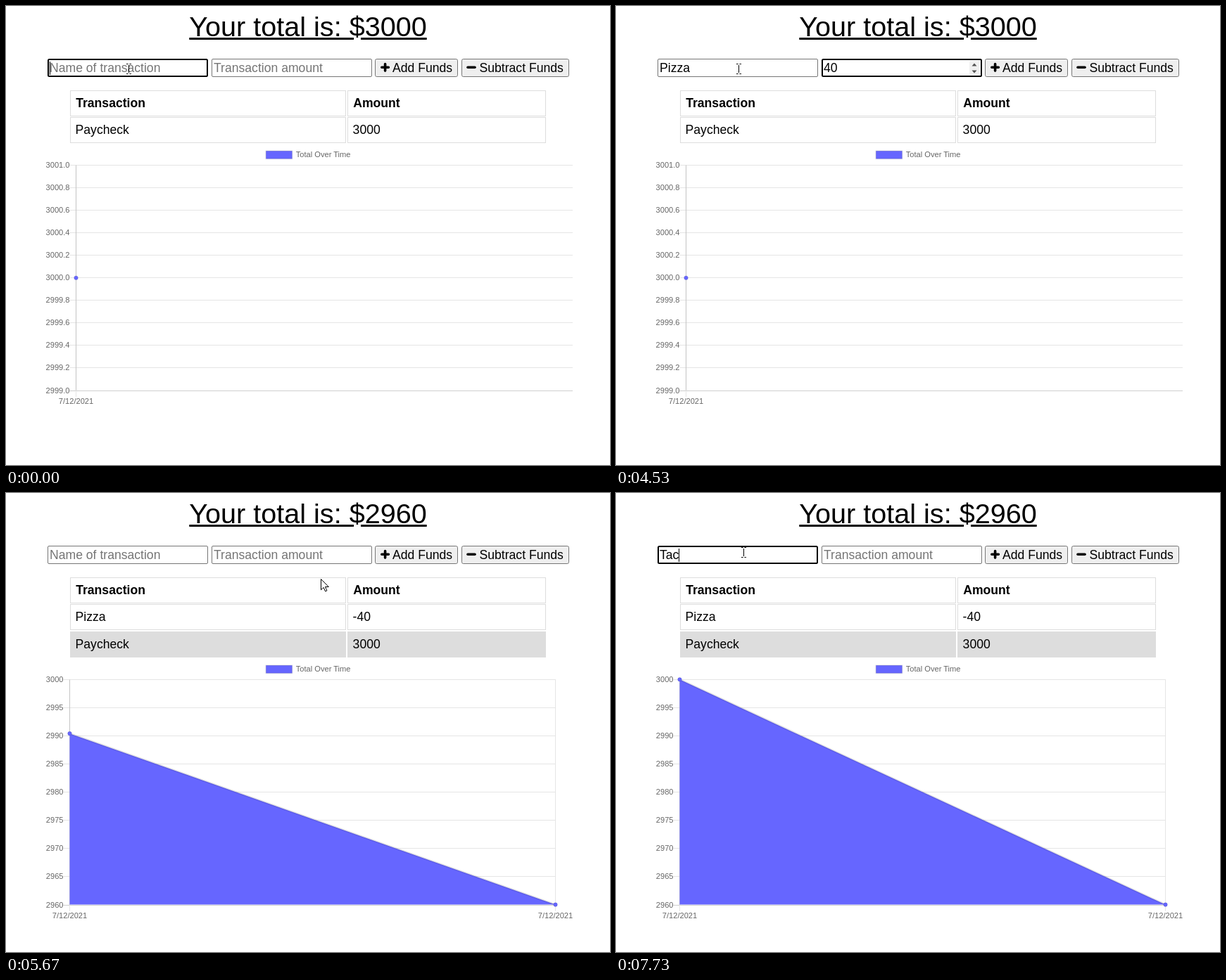
An HTML page that plays this animation: 858x653 px, repeating every 8000 ms.

```html
<!DOCTYPE html>
<html lang="en">
<head>
<meta charset="utf-8">
<title>Budget tracker</title>
<style>
  html, body { margin: 0; width: 858px; height: 653px; overflow: hidden; background: #fff; }
  body { position: relative; font-family: "Liberation Sans", Arial, sans-serif; }
  #title { position: absolute; left: 0; top: 9px; width: 858px; text-align: center;
    font-size: 39.6px; line-height: 40px; text-decoration: underline; white-space: nowrap; }
  svg { position: absolute; left: 0; top: 0; display: block; }
  text { font-size: 17.6px; white-space: pre; }
  .th { font-weight: bold; }
  .tick { font-size: 11.1px; fill: #666; }
</style>
</head>
<body>
<div id="title"></div>
<svg id="stage" width="858" height="653" viewBox="0 0 858 653"></svg>
<script>
const LOOP = 8000, FPS = 15, BLUE = '#6666ff';
const stage = document.getElementById('stage');
const title = document.getElementById('title');

function add(parent, tag, attrs, content) {
  const el = document.createElementNS('http://www.w3.org/2000/svg', tag);
  set(el, attrs);
  if (content !== undefined) el.textContent = content;
  parent.appendChild(el);
  return el;
}
function set(el, attrs) {
  for (const k in attrs) el.setAttribute(k, attrs[k]);
}
const show = (el, on) => set(el, { visibility: on ? 'visible' : 'hidden' });
const text = (p, x, y, s, attrs) => add(p, 'text', { x, y, ...attrs }, s);
const path = (p, d, attrs) => add(p, 'path', { d, ...attrs });

// ---- form ----
function makeInput(x, hint) {
  const box = add(stage, 'rect', { rx: 1.5, fill: '#fff' });
  const label = text(stage, x + 3, 94, '');
  const caret = add(stage, 'rect', { y: 79, width: 1, height: 19 });
  return (value, focus, caretOn) => {
    const w = focus ? 2 : 1;
    set(box, {
      x: x + w / 2 - .5 * (w - 1) + .5 * (w - 1), y: 75 + w / 2, width: 228 - w, height: 26 - w,
      stroke: focus ? '#000' : '#767676', 'stroke-width': w
    });
    label.textContent = value || hint;
    set(label, { fill: value ? '#000' : '#757575' });
    const end = value ? Math.round(label.getComputedTextLength()) : 0;
    set(caret, { x: x + 3 + end });
    show(caret, focus && caretOn);
  };
}
function makeButton(x, width, icon, textX, label) {
  const box = add(stage, 'rect', { x: x + .5, y: 75.5, width: width - 1, height: 25, rx: 2.2 });
  path(stage, icon, { stroke: '#000', 'stroke-width': 3.6, 'stroke-linecap': 'round' });
  text(stage, textX, 94, label);
  return hover => set(box, { fill: hover ? '#e5e5e5' : '#efefef', stroke: hover ? '#4f4f4f' : '#767676' });
}
const nameInput = makeInput(59, 'Name of transaction');
const amountInput = makeInput(292, 'Transaction amount');
const spinner = add(stage, 'g', {});
add(spinner, 'rect', { x: 502, y: 78, width: 14, height: 20, fill: '#f0f0f0' });
path(spinner, 'M505.5 85.5l3.5-4 3.5 4zM505.5 91.5l3.5 4 3.5-4z', { fill: '#505050' });
const addButton = makeButton(524, 118, 'M533.8 87.3h9.6M538.6 82.5v9.6', 549, 'Add Funds');
const subButton = makeButton(647, 153, 'M656 87.3h10', 672.5, 'Subtract Funds');

// ---- table ----
function row(parent, y, a, b, opt = {}) {
  [[91, 392, a], [485, 282, b]].forEach(([x, w, s]) => {
    add(parent, 'rect', { x: x + .5, y: y + .5, width: w - 1, height: 36, fill: opt.fill || '#fff', stroke: '#ddd' });
    text(parent, x + (opt.head ? 8.2 : 7.6), y + 24, s, opt.head ? { class: 'th' } : {});
  });
}
row(stage, 120, 'Transaction', 'Amount', { head: true });
const before = add(stage, 'g', {}), after = add(stage, 'g', {});
row(before, 158, 'Paycheck', '3000');
row(after, 158, 'Pizza', '-40');
row(after, 197, 'Paycheck', '3000', { fill: '#ddd' });

// ---- chart ----
function line(parent, x1, y1, x2, y2, stroke) {
  add(parent, 'line', { x1, y1, x2, y2, stroke });
}
function chart(parent, left, right, top, labels) {
  const bottom = top + 320.5, n = labels.length - 1;
  add(parent, 'rect', {
    x: 369.3, y: top - 20.3, width: 37.2, height: 11.2, fill: BLUE, stroke: '#000', 'stroke-opacity': .1, 'stroke-width': 1.6
  });
  text(parent, 411.8, top - 11.5, 'Total Over Time', { class: 'tick' });
  labels.forEach((s, i) => {
    const y = Math.floor(top + 320.5 * i / n) + .5;
    line(parent, left - 9, y, right, y, i === n ? '#cfcfcf' : '#e5e5e5');
    text(parent, left - 9, y + 3, s, { class: 'tick', 'text-anchor': 'end' });
  });
  line(parent, left, top, left, bottom + 9, '#e5e5e5');
  line(parent, left, top, left, bottom, '#c4c4c4');
}
const date = (parent, x, y) => text(parent, x, y, '7/12/2021', { class: 'tick', 'text-anchor': 'middle' });
const dot = (parent, cx, cy) => add(parent, 'circle', {
  cx, cy, r: 2.8, fill: BLUE, stroke: '#000', 'stroke-opacity': .1
});
const ticks = (n, f) => Array.from({ length: n }, (_, i) => f(i));

chart(before, 99.5, 805, 226.5, ticks(11, i => (3001 - i / 5).toFixed(1)));
date(before, 99.5, 566);
dot(before, 99.5, 386.7);

const X0 = 90.5, X1 = 780.5, TOP = 265.3, BASE = 585.6;
chart(after, X0, X1, 265.5, ticks(9, i => 3000 - 5 * i));
line(after, X1, 265, X1, 595, '#e5e5e5');
date(after, X0, 604.5);
date(after, X1, 604.5);
const area = path(after, '', { fill: BLUE });
const edge = path(after, '', { stroke: '#000', 'stroke-opacity': .1, 'stroke-width': 2.8, fill: 'none' });
const startDot = dot(after, X0, BASE);
dot(after, X1, BASE);

// ---- pointer ----
const arrow = path(stage, 'M.5.5v15.3l3.6-3.4 2.5 5.5 2.3-1-2.4-5.4h4.8z', { fill: '#fff', stroke: '#000' });
const beam = path(stage, 'M.5-5v11M-3-6.5h2.6M1.4-6.5h2.6M-3 7.5h2.6M1.4 7.5h2.6', { stroke: '#000', fill: 'none' });

// time, x, y
const track = [
  [0, 174, 89], [4533, 174, 89], [4600, 192, 94], [4667, 275, 106], [4733, 395, 110], [4800, 515, 109],
  [4867, 615, 103], [4933, 685, 95], [5000, 722, 87], [5067, 731, 82], [5400, 731, 82], [5467, 690, 92],
  [5533, 612, 109], [5600, 530, 119], [5667, 447, 122], [5733, 372, 120], [5800, 297, 114],
  [5867, 232, 107], [5933, 185, 101], [6000, 180, 92], [6067, 181, 84], [LOOP, 181, 84]
];
function pointer(t) {
  const i = Math.max(1, track.findIndex(k => k[0] >= t));
  const [ta, xa, ya] = track[i - 1], [tb, xb, yb] = track[i];
  const u = (t - ta) / (tb - ta);
  return [Math.round(xa + (xb - xa) * u), Math.round(ya + (yb - ya) * u)];
}

// ---- script of typing and caret: [time, value] ----
const nameSteps = [[0, ''], [1530, 'P'], [1730, 'Pi'], [2000, 'Piz'], [2470, 'Pizz'], [2730, 'Pizza'],
  [5465, ''], [7130, 'T'], [7470, 'Ta'], [7730, 'Tac']];
const amountSteps = [[0, ''], [3870, '4'], [4000, '40'], [5465, '']];
const caretSteps = [[0, true], [470, false], [1000, true], [3470, false], [3870, true],
  [4530, false], [6265, true], [6800, false], [7130, true]];
const at = (steps, t) => steps.filter(s => s[0] <= t).pop()[1];

function draw(ms) {
  // the picture advances at 15 frames a second
  const t = Math.floor((ms + 4) * FPS / 1000) * 1000 / FPS + .5;
  const paid = t >= 5330;
  title.textContent = 'Your total is: $' + (paid ? 2960 : 3000);
  show(before, !paid);
  show(after, paid);

  const caret = at(caretSteps, t + 4);
  const onAmount = t >= 2930 && t < 5065;
  nameInput(at(nameSteps, t + 4), t < 2930 || t >= 6265, caret);
  amountInput(at(amountSteps, t + 4), onAmount, caret);
  show(spinner, onAmount);

  const u = Math.min(1, Math.max(0, (t - 5367) / 1000));
  const y = BASE - (BASE - TOP) * (1 - (1 - u) ** 4);
  set(area, { d: `M${X0} ${y}L${X1} ${BASE}H${X0}z` });
  set(edge, { d: `M${X0} ${y}L${X1} ${BASE}` });
  set(startDot, { cy: y });

  const [x, py] = pointer(t);
  const inside = (a, b) => x >= a && x < b && py >= 75 && py < 101;
  const typing = inside(59, 287) || inside(292, 520);
  addButton(inside(524, 642));
  subButton(inside(647, 800));
  show(arrow, !typing);
  show(beam, typing);
  set(typing ? beam : arrow, { transform: `translate(${x} ${py})` });
}

const start = performance.now();
function tick() {
  draw((performance.now() - start) % LOOP);
  requestAnimationFrame(tick);
}
tick();
</script>
</body>
</html>
```
